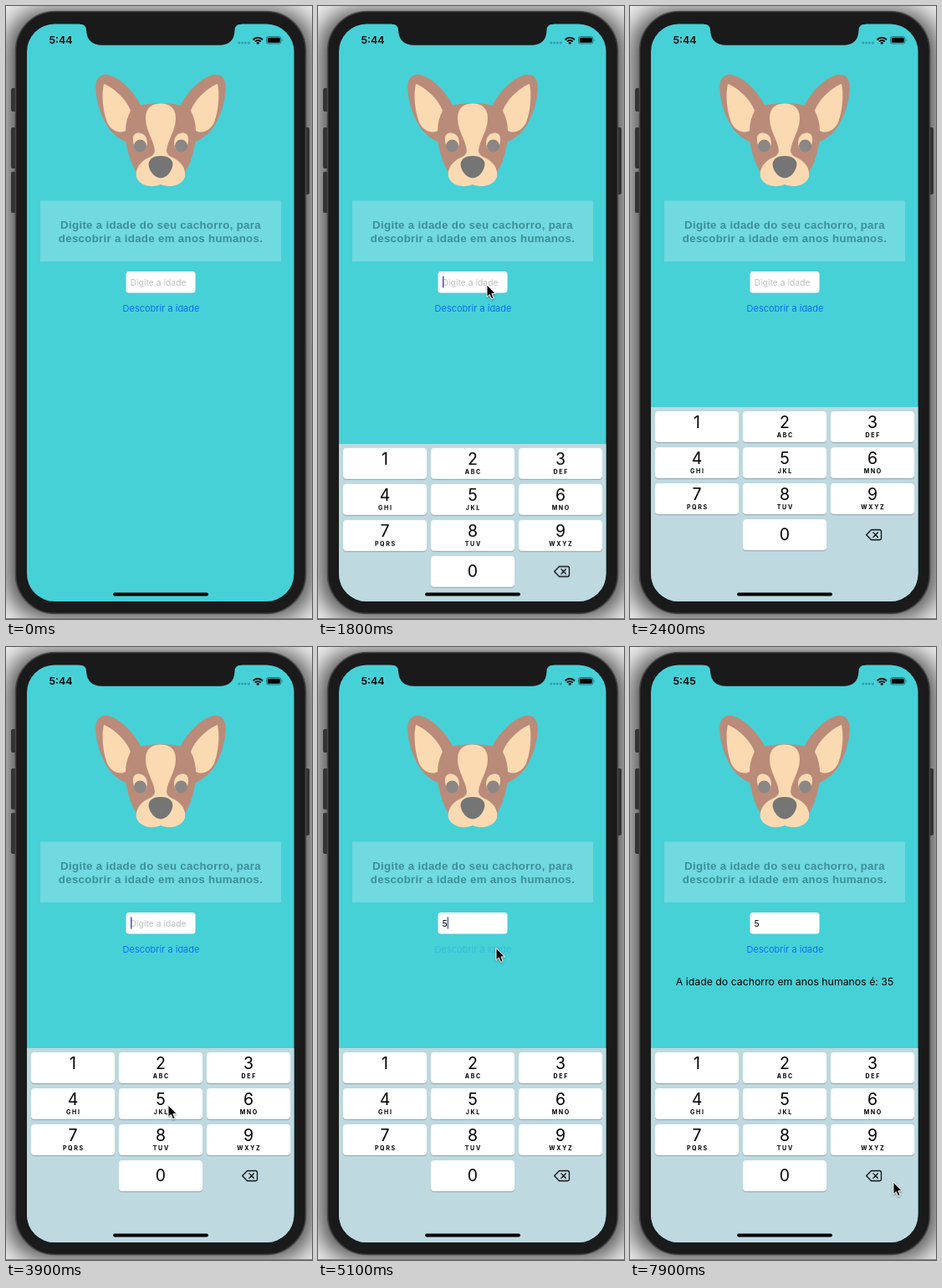
These frames come from a looping animation (366 px wide and 732 px high, 8 s). An HTML page:

```html
<!DOCTYPE html>
<html lang="pt">
<head>
<meta charset="utf-8">
<title>Idade do cachorro</title>
<style>
html, body { margin: 0; width: 100%; height: 100%; overflow: hidden; background: #fff; }
svg { display: block; width: 366px; height: 732px; font-family: Inter, Roboto, sans-serif; }
.mid { text-anchor: middle; }
.title { font: bold 13.3px "Liberation Sans", Arial, sans-serif; letter-spacing: .3px; fill: #3b8f97; }
.clock { font-size: 12.4px; font-weight: 600; }
.field { font-size: 10.4px; }
.button { font-size: 11px; fill: #0b72f5; }
.result { font-size: 12.3px; }
.digit { font-size: 19.5px; }
.letters { font-size: 7.1px; font-weight: 700; letter-spacing: 1.6px; }

.keyboard, .pointer, .arrow, .button, .pressed, .caret, .typed, .hint, .result, .before, .after {
  animation: 8s step-end infinite;
}
.keyboard { animation-name: slide; animation-timing-function: cubic-bezier(.38,.7,.125,1); }
.pointer { animation-name: travel; animation-timing-function: ease-in-out; }
.arrow { animation-name: show-arrow; }
.button { animation-name: tap; animation-timing-function: linear; }
.pressed { animation-name: press; }
.caret { animation-name: blink, advance; }
.typed { animation-name: typed; }
.hint { animation-name: hint; }
.result { animation-name: result; }
.before { animation-name: before; }
.after { animation-name: after; }

@keyframes slide {
  0%, 20.34% { transform: translateY(233px); }
  26.6%, 100% { transform: none; }
}
@keyframes travel {
  0%, 11.5% { transform: translate(368px, 405px); }
  14.4%, 38.75% { transform: translate(202px, 333px); }
  46.25%, 53.1% { transform: translate(194px, 547px); }
  60.6%, 91.25% { transform: translate(213px, 359.5px); }
  97.5%, 100% { transform: translate(315px, 639px); }
}
@keyframes show-arrow { 0% { opacity: 1; } 23.75% { opacity: 0; } 38.75%, 100% { opacity: 1; } }
@keyframes tap {
  0%, 62.4% { opacity: 1; }
  62.5%, 65% { opacity: .22; }
  69%, 100% { opacity: 1; }
}
@keyframes press { 0% { opacity: 0; } 50% { opacity: 1; } 51.75%, 100% { opacity: 0; } }
@keyframes blink {
  0%, 26.25%, 38.75%, 57.5%, 70%, 82.5%, 95%, 100% { opacity: 0; }
  20%, 32.5%, 45%, 63.75%, 76.25%, 88.75% { opacity: 1; }
}
@keyframes advance { 0% { transform: none; } 51.25%, 100% { transform: translateX(5.5px); } }
@keyframes typed { 0% { opacity: 0; } 51.25%, 100% { opacity: 1; } }
@keyframes hint { 0% { opacity: 1; } 51.25%, 100% { opacity: 0; } }
@keyframes result { 0% { opacity: 0; } 65%, 100% { opacity: 1; } }
@keyframes before { 0% { opacity: 1; } 93.75%, 100% { opacity: 0; } }
@keyframes after { 0% { opacity: 0; } 93.75%, 100% { opacity: 1; } }
</style>
</head>
<body>
<svg viewBox="0 0 366 732">
  <defs>
    <clipPath id="screen"><rect x="25" y="21.500" width="319.500" height="689.500" rx="33"/></clipPath>
    <filter id="soft" x="-20%" y="-20%" width="140%" height="140%"><feGaussianBlur stdDeviation="14"/></filter>
    <filter id="drop" x="-50%" y="-50%" width="200%" height="200%">
      <feDropShadow dx="0" dy="1" stdDeviation=".9" flood-opacity=".4"/>
    </filter>
  </defs>

  <!-- phone body -->
  <rect width="366" height="732" fill="#eee"/>
  <rect x="1" y="4" width="367" height="728" rx="46" opacity=".68" filter="url(#soft)"/>
  <rect y="731" width="366" height="1" fill="#777"/>
  <g fill="#333">
    <rect x="6" y="98" width="8" height="28" rx="2"/>
    <rect x="6" y="145" width="8" height="49" rx="2"/>
    <rect x="6" y="198" width="8" height="49" rx="2"/>
    <rect x="356" y="145" width="7" height="80" rx="2"/>
  </g>
  <rect x="11.500" y="6.500" width="347" height="719" rx="47" fill="#1a1a1b" stroke="#484848" stroke-width="1.600"/>

  <g clip-path="url(#screen)">
    <rect x="25" y="21" width="320" height="690" fill="#46d1d7"/>

    <!-- dog -->
    <g>
      <path id="ear" fill="#ba8b79" d="M107.500 101C106 88 112 80 122 82C138 86 153 103 161 118L146 163C134 159 123 149 117 136C111 124 108 112 107.500 101Z"/>
      <path id="inner" fill="#fbdab2" d="M117 93C128 97 144 111 149 125C145 133 143 141 143 149C135 153 126 149 121 139C116 126 114 106 117 93Z"/>
      <use href="#ear" transform="matrix(-1 0 0 1 370 0)"/>
      <use href="#inner" transform="matrix(-1 0 0 1 370 0)"/>
      <path fill="#ba8b79" d="M158 120C166 115 204 115 212 120C222 130 227 148 227 160C224 177 220 192 211 202H159C150 192 146 177 143 160C143 148 148 130 158 120Z"/>
      <path fill="#fbdab2" d="M185 116.500C196 116.500 203 122 203 134C203 149 193 160 192 173C193 181 201 180 207 186C213 191 215 198 214 204C211 214 196 218 185 213C174 218 159 214 156 204C155 198 157 191 163 186C169 180 177 181 178 173C177 160 167 149 167 134C167 122 174 116.500 185 116.500Z"/>
      <g id="eye">
        <path fill="#fbdab2" d="M152 158C152 151 159 150 164 153C169 156 171 165 166 172C160 175 151 169 152 158Z"/>
        <circle cx="160.500" cy="167" r="7.500" fill="#8b8784"/>
      </g>
      <use href="#eye" transform="matrix(-1 0 0 1 370 0)"/>
      <path fill="#757575" d="M170.500 189C171 182 177 179 185 179C193 179 199 182 199.500 189C199 197 192 205.500 185 205.500C178 205.500 171 197 170.500 189Z"/>
    </g>

    <rect x="41" y="232.500" width="288" height="72.500" fill="#fff2ff" opacity=".23"/>
    <g class="title mid">
      <text x="185" y="266.300">Digite a idade do seu cachorro, para</text>
      <text x="185" y="282.300">descobrir a idade em anos humanos.</text>
    </g>

    <rect x="143.500" y="317" width="83" height="25.500" rx="3.500" fill="#fff"/>
    <g class="field">
      <text class="hint" x="148.500" y="334" fill="#bdbdc0">Digite a idade</text>
      <text class="typed" x="148.500" y="334">5</text>
    </g>
    <rect class="caret" x="149" y="322.500" width="1.500" height="14" fill="#4750d9"/>
    <text class="button mid" x="185.500" y="365">Descobrir a idade</text>
    <text class="result mid" x="185" y="403.500">A idade do cachorro em anos humanos é: 35</text>

    <!-- status bar -->
    <g class="clock">
      <text class="before" x="51.500" y="45">5:44</text>
      <text class="after" x="51.500" y="45">5:45</text>
    </g>
    <path d="M277.500 44H292" stroke="#2c9da5" stroke-width="2.400" stroke-dasharray="2.600 1.200"/>
    <path d="M295.500 40.200Q301.200 35.300 307 40.200M297.700 42.500Q301.200 39.500 304.800 42.500" fill="none" stroke="#000" stroke-width="1.900"/>
    <path d="M299.200 44L301.200 46L303.300 44Q301.200 42.200 299.200 44Z"/>
    <rect x="311.500" y="36.500" width="17.500" height="8.500" rx="2.500" fill="none" stroke="#176d73" stroke-width=".9"/>
    <rect x="312.800" y="37.800" width="15" height="6" rx="1.300"/>
    <path d="M330.300 39.200Q331.900 40.700 330.300 42.300Z" fill="#176d73"/>

    <g class="keyboard">
      <rect x="25" y="479" width="320" height="233" fill="#bed9e0"/>
      <g id="keys"></g>
      <path d="M288.500 625.500H298.500Q300.500 625.500 300.500 627.500V635.500Q300.500 637.500 298.500 637.500H288.500L282.700 631.500ZM291 628.800L296.400 634.200M296.400 628.800L291 634.200"
        fill="none" stroke="#111" stroke-width="1.300" stroke-linejoin="round" stroke-linecap="round"/>
    </g>
    <rect x="128" y="700.500" width="114" height="4" rx="2"/>
  </g>

  <!-- notch -->
  <path fill="#1a1a1b" d="M88 18V21.500Q96 21.500 96 29Q97 46.700 115 46.700H255Q273 46.700 273.500 29Q273.500 21.500 282 21.500V18Z"/>

  <g class="pointer"><g class="arrow">
    <path filter="url(#drop)" stroke="#fff" stroke-width="1" d="M0 0V14.500L3.300 11.400L5.600 16.800L8.200 15.700L5.900 10.400H10.300Z"/>
  </g></g>
</svg>
<script>
const labels = ['', 'ABC', 'DEF', 'GHI', 'JKL', 'MNO', 'PQRS', 'TUV', 'WXYZ'];

function key(digit, letters, col, row) {
  const x = 30 + col * 105, y = 484 + row * 43, mid = x + 50;
  const cap = (fill, dy, extra = '') =>
    `<rect x="${x}" y="${y + dy}" width="100" height="37" rx="4" fill="${fill}" ${extra}/>`;
  return cap('#91a4aa', 1) + cap('#fff', 0) +
    (digit === 5 ? cap('#d3e4e9', 0, 'class="pressed"') : '') +
    `<text class="digit mid" x="${mid}" y="${y + (digit ? 20 : 25)}">${digit}</text>` +
    `<text class="letters mid" x="${mid + 0.8}" y="${y + 31.2}">${letters}</text>`;
}

document.getElementById('keys').innerHTML =
  labels.map((text, i) => key(i + 1, text, i % 3, Math.floor(i / 3))).join('') + key(0, '', 1, 3);
</script>
</body>
</html>
```
